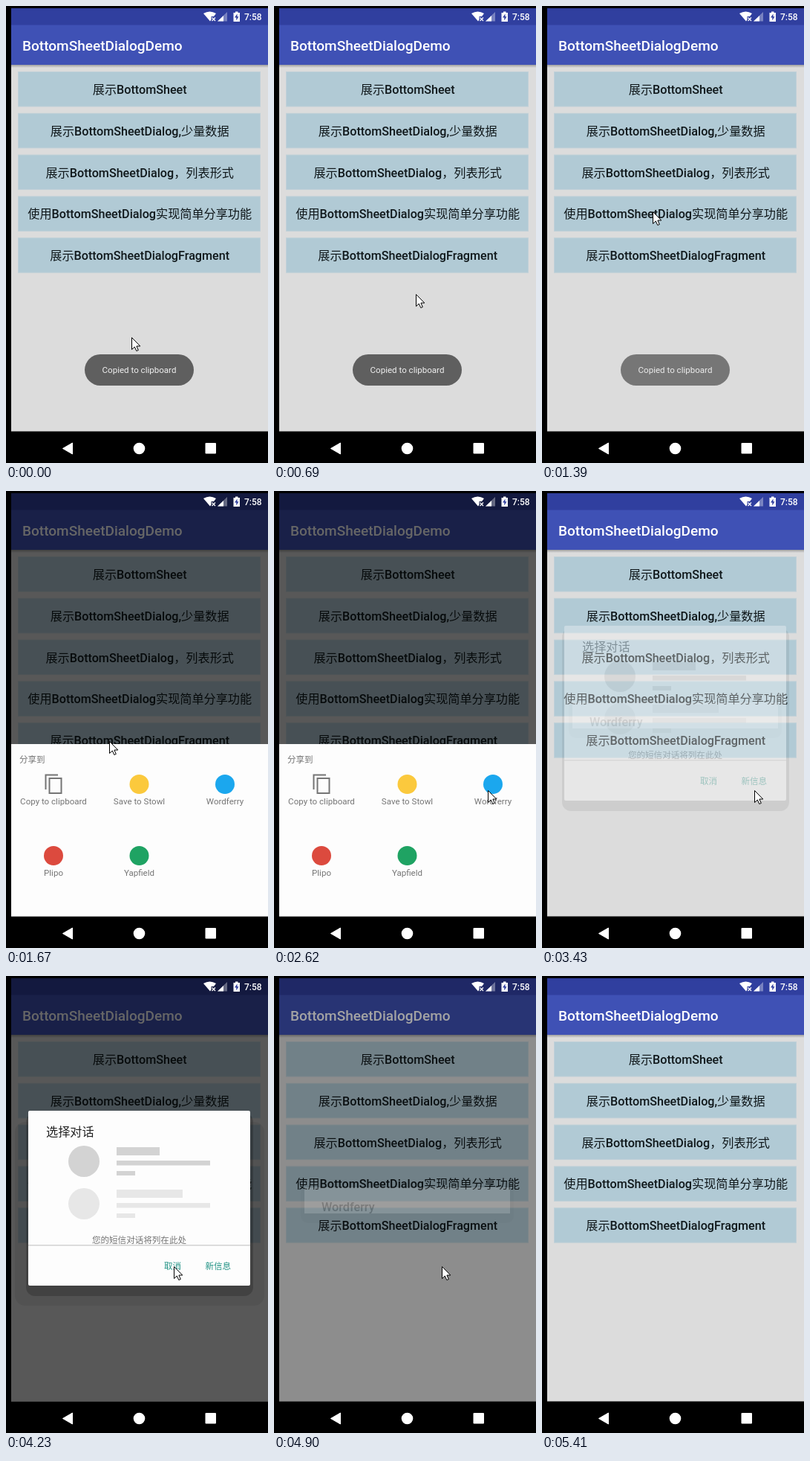
An HTML page for the animation above (5970 ms loop, 353 px wide and 614 px high).

```html
<!DOCTYPE html>
<html lang="zh">
<head>
<meta charset="utf-8">
<style>
  html, body { margin: 0; width: 100%; height: 100%; overflow: hidden; background: #000; }
  svg { display: block; width: 353px; height: 614px; }
  text { font-family: Roboto, "Noto Sans CJK SC", "Noto Sans CJK", sans-serif; font-size: 11.55px; fill: #757575; }
  .mid { text-anchor: middle; }
  .medium { font-weight: 500; }
  .item { font-size: 16.15px; font-weight: 500; fill: #10181b; }
  .item tspan { font-weight: 400; }
  .action { fill: #229385; }
  .button { fill: #b1cad5; stroke: #bfd0d8; }
</style>
</head>
<body>
<svg viewBox="0 0 353 614">
  <defs>
    <clipPath id="screen"><path d="M7 3H353V571.5H7z"/></clipPath>
    <linearGradient id="barShadow" x2="0" y2="1">
      <stop stop-color="#000" stop-opacity=".28"/>
      <stop offset="1" stop-color="#000" stop-opacity="0"/>
    </linearGradient>
  </defs>
  <rect width="353" height="614"/>

  <g clip-path="url(#screen)">
    <path fill="#dcdcdc" d="M7 3H353V572H7z"/>
    <path fill="#303f9f" d="M7 3H353V26H7z"/>
    <path fill="#3f51b5" d="M7 25.5H353V79H7z"/>
    <path fill="url(#barShadow)" d="M7 79H353V83H7z"/>
    <text class="medium" x="22" y="60" style="font-size:19.05px;fill:#fff">BottomSheetDialogDemo</text>
    <g id="buttons"></g>

    <path id="dim" d="M7 3H353V572H7z"/>

    <g id="sheet">
      <path fill="#fdfdfd" d="M7 340H353V572H7z"/>
      <text x="18" y="364.5">分享到</text>
      <path fill="none" stroke="#757575" stroke-width="2" d="M53.5 401V381.5H70M58.5 386H74.5V406H58.5z"/>
      <g id="apps"></g>
    </g>

    <g id="splash">
      <rect x="36" y="282" width="287" height="50" rx="10" opacity=".15"/>
      <path fill="#fff" d="M41 284H318V319H41z"/>
      <text class="medium" x="64" y="316" style="font-size:16.2px;fill:#111">Wordferry</text>
    </g>

    <g id="dialog">
      <rect id="halo" x="12" y="196" width="336" height="247" rx="14" fill-opacity=".07"/>
      <rect x="27" y="184" width="306" height="246" rx="12" opacity=".2"/>
      <rect x="30" y="181" width="299" height="235" rx="2" fill="#fdfdfd"/>
      <text x="54" y="215" style="font-size:16.2px;fill:#212121">选择对话</text>
      <g id="rows"></g>
      <text class="mid" x="179.5" y="358.5">您的短信对话将列在此处</text>
      <path fill="#d2d2d2" d="M30 361H329V362.5H30z"/>
      <text class="action medium" x="213" y="393.5">取消</text>
      <text class="action medium" x="268.5" y="393.5">新信息</text>
    </g>

    <g id="toast">
      <rect x="106" y="468" width="147" height="42" rx="21" fill="#5f5f5f"/>
      <text class="mid" x="179.5" y="492.5" style="fill:#f0f0f0">Copied to clipboard</text>
    </g>
  </g>

  <g fill="#fff">
    <path d="M266 10Q274.5 5 283 10L280 14H276.5V18.5L275 20.5z"/>
    <path stroke="#fff" stroke-width="1.3" d="M277.5 15.5l4.5 4.5m0-4.5l-4.5 4.5"/>
    <path opacity=".35" d="M285 20.5L298 8V20.5z"/>
    <path d="M285 20.5L293 13V20.5z"/>
    <path d="M306.5 9H309V7.5H312.5V9H315V21H306.5z"/>
    <path fill="#303f9f" d="M311.5 10.5L308 15.5H310.3V19.5L313.5 14.3H311.5z"/>
    <text class="medium" x="321" y="18.5" style="font-size:12px;fill:#fff">7:58</text>
    <path stroke="#fff" stroke-linejoin="round" d="M76.5 594.5L89.5 587V602z"/>
    <circle cx="179.5" cy="594.5" r="7.8"/>
    <rect x="268.5" y="587" width="14.5" height="14.5" rx="1"/>
  </g>
  <path id="cursor" fill="#fff" stroke="#000" d="M.5 .5V16.5L4.3 13L6.8 18.5L9.3 17.4L6.9 12H11.8z"/>
</svg>

<script>
const LOOP = 5970, STEPS = 44;   // the screen refreshes 44 times per loop
const $ = id => document.getElementById(id);
const fill = (id, items, markup) => $(id).innerHTML = items.map(markup).join("");

const labels = ["展示BottomSheet", "展示BottomSheetDialog,少量数据", "展示BottomSheetDialog，列表形式",
  "使用BottomSheetDialog实现简单分享功能", "展示BottomSheetDialogFragment"];
fill("buttons", labels, (label, i) => {
  const y = 88.5 + i * 55.8;
  const mixed = label.replace(/[^\x00-\x7f]+/g, "<tspan>$&</tspan>");
  return `<rect class="button" x="16.5" y="${y}" width="326" height="46.5"/>
    <text class="item mid" x="180.2" y="${Math.round(y + 29.4)}">${mixed}</text>`;
});

const apps = [["Copy to clipboard", "none"], ["Save to Stowl", "#fbc93d"], ["Wordferry", "#1ba7ee"],
  ["Plipo", "#dc4a3e"], ["Yapfield", "#1fa363"]];
fill("apps", apps, ([name, color], i) => {
  const x = 64 + i % 3 * 115.5, y = 394 + Math.floor(i / 3) * 96;
  return `<circle cx="${x}" cy="${y}" r="13" fill="${color}"/>
    <text class="mid" x="${x}" y="${y + 26.5}">${name}</text>`;
});

fill("rows", ["#d3d3d3", "#e7e7e7"], (color, i) => `<g fill="${color}" transform="translate(0 ${i * 57})">
  <circle cx="105" cy="249" r="21"/>
  <path d="M149 230h${58 + i * 31}v11H149zM149 248h126v6.5H149zM149 262h25v6H149z"/></g>`);

// Pointer stops: [step, x, y].
const stops = [[0, 169, 445], [1, 169, 408], [3, 266, 562], [6, 153, 299], [8, 149, 276], [11, 149, 276],
  [15, 108, 515], [16, 128, 440], [17, 334, 391], [19, 288, 402], [25, 286, 402], [29, 211, 402],
  [31, 226, 390], [36, 226, 390], [40, 300, 620]];

const ramp = (step, from, to) => Math.min(1, Math.max(0, (step - from) / (to - from)));
const bump = (step, peak) => Math.max(0, 1 - Math.abs(step - peak) / 2);

function pointer(step) {
  const next = stops.findIndex(stop => stop[0] > step);
  if (next < 0) return stops.at(-1).slice(1);
  const [from, x, y] = stops[next - 1], [to, x2, y2] = stops[next];
  const k = ramp(step, from, to);
  return [x + (x2 - x) * k, y + (y2 - y) * k].map(Math.round);
}

function draw() {
  const step = Math.floor((performance.now() % LOOP + 20) / LOOP * STEPS) % STEPS;
  const sheetDim = ramp(step, 10, 12) - ramp(step, 22, 25);
  const dialogDim = ramp(step, 25, 29) - ramp(step, 34, 39);
  const sheetOpen = ramp(step, 10, 12) - ramp(step, 22, 24);
  const opacity = {
    toast: 1 - ramp(step, 9, 12) ** 1.5,
    dim: .6 * (sheetDim + dialogDim),
    splash: .28 * (bump(step, 24) + bump(step, 35)),
    dialog: ramp(step, 24, 27) - ramp(step, 34, 36),
    halo: dialogDim
  };
  for (const id in opacity) $(id).setAttribute("opacity", opacity[id]);
  $("sheet").setAttribute("transform", `translate(0 ${232 * (1 - sheetOpen)})`);
  $("cursor").setAttribute("transform", `translate(${pointer(step)})`);
  requestAnimationFrame(draw);
}
draw();
</script>
</body>
</html>
```
